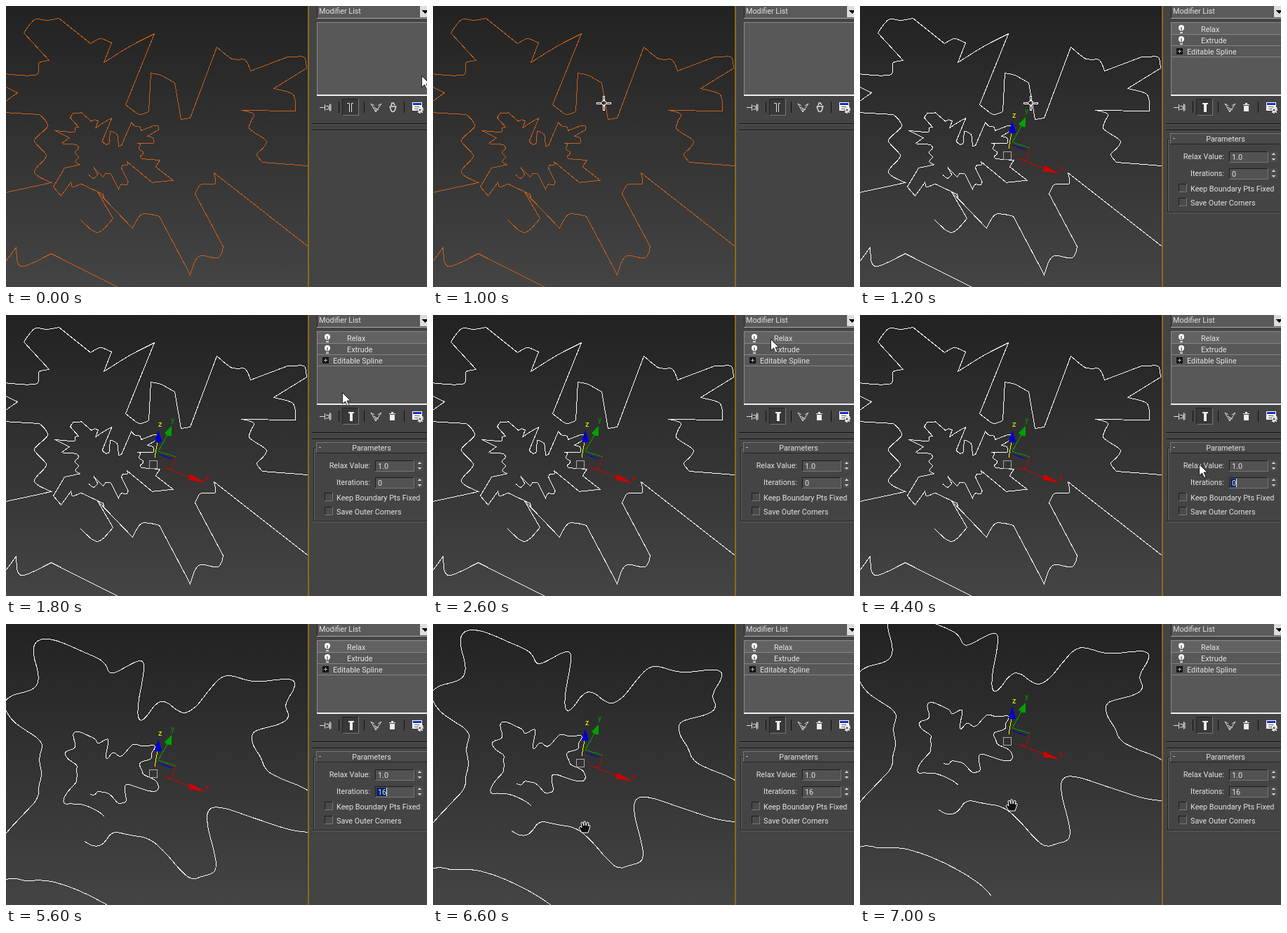
An HTML page that plays this animation: 600 px wide and 400 px high, repeating every 8000 ms.

```html
<!DOCTYPE html>
<html lang="en">
<head>
<meta charset="utf-8">
<title>Relax modifier</title>
<style>
  html, body { margin: 0; height: 100%; overflow: hidden; background: #444; }
  svg { display: block; }
  text { font: 10.8px Roboto, "Noto Sans", sans-serif; fill: #e4e4e4; white-space: pre; }
  .end { text-anchor: end; }
  .mid { text-anchor: middle; }
  .crisp, #gizmo polyline { shape-rendering: crispEdges; }
  #gizmo polyline { fill: none; }
</style>
</head>
<body>
<svg width="600" height="400" viewBox="0 0 600 400">
  <defs>
    <linearGradient id="sky" x2="0" y2="1"><stop stop-color="#222"/><stop offset="1" stop-color="#444"/></linearGradient>
  </defs>
  <rect width="431" height="400" fill="url(#sky)"/>
  <path id="spline" class="crisp" fill="none" transform="translate(.5 .5)"/>

  <g id="gizmo">
    <rect x="204.5" y="207.5" width="11" height="11" fill="none" stroke="#aaa" class="crisp"/>
    <polyline points="217,198 237,205" stroke="#0000c8"/>
    <polyline points="231,169 217,194 242,202" stroke="#00a000"/>
    <polyline points="242,202 236,220 224,217" stroke="#c80000"/>
    <polyline points="228,218 264,232" stroke="#c80000"/>
    <polyline points="212,203 216,180" stroke="#ff0"/>
    <path d="M217,164L212,180Q217,183 222,180Z" fill="#0000d0"/>
    <path d="M236,158L226,168Q230,173 236,172Z" fill="#00a000"/>
    <path d="M285,239L263,227Q260,231 261,235Z" fill="#d00000"/>
    <text x="217" y="159" style="fill:#ff0">z</text>
    <text x="235" y="153" style="fill:#00a000">y</text>
    <text x="284" y="235" style="fill:#d00000">x</text>
  </g>

  <rect x="430" width="170" height="400" fill="#444"/>
  <rect x="430" width="2" height="400" fill="#8a6a1e"/>

  <g class="crisp">
    <path d="M443,0H600V18H443Z" fill="#5a5a5a"/>
    <path d="M443.5,0V18" stroke="#222"/>
    <path d="M443,17.5H600" stroke="#aaa"/>
    <path d="M590,0H600V16H590Z" fill="#ddd"/>
    <path d="M593,6H602L597.5,11Z" fill="#000"/>
    <rect x="443" y="23" width="160" height="104" fill="#585858"/>
    <path d="M443.5,127V23.5H600" fill="none" stroke="#8c8c8c"/>
    <path d="M443,127H600" stroke="#eee" stroke-width="2"/>
    <path d="M436,167.5H600M436,176.5H600" stroke="#111"/>
    <path d="M436,168.5H600M436,177.5H600" stroke="#555"/>
    <path d="M474.5,136V152M510.5,136V152M567.5,136V152" stroke="#111"/>
    <rect x="479.5" y="132.5" width="23" height="23" fill="#383838" stroke="#222"/>
    <path d="M480,155.5H502.5V132" fill="none" stroke="#777"/>
  </g>
  <text x="446" y="11">Modifier List</text>

  <!-- stack toolbar -->
  <g fill="none" stroke="#ddd">
    <path d="M447,144.5H454M454.5,140V149M456,142.5H460V147H456M461.5,139V150M463,140V149"/>
    <path d="M520,139L527,151L535,139M520,139L525,142M535,139L530,142M527,151V146M524,144L531,148"/>
  </g>
  <g class="crisp">
    <rect x="579" y="137" width="14" height="12" fill="#fff"/>
    <rect x="580" y="138" width="12" height="3" fill="#1830c0"/>
    <path d="M582,143.5H590M582,146.5H588" stroke="#555"/>
    <path d="M585,148H595M590,143V153M587,145L594,152M594,145L587,152" stroke="#ddd" stroke-width="2"/>
    <rect x="589" y="147" width="2" height="2" fill="#333"/>
  </g>
  <g id="idleIcons" fill="none" stroke="#ddd">
    <path d="M486,138.5H489.5V151M495,138.5H492.5V151"/>
    <path d="M547,143L549,149Q551,152 554,149L556,142M547,143H555M549,142L550,138H552L554,141" stroke-width="1.5"/>
  </g>

  <g id="active">
    <path d="M488,138H496V140H494V151H490V140H488Z" fill="#eee"/>
    <path d="M547,142H554V150H547ZM546,140H555V141H546ZM549,138H552V140H549Z" fill="#eee"/>
    <path class="crisp" d="M444,24H600V40H444Z" fill="#626262"/>
    <path class="crisp" d="M444,40.5H600M444,56.5H600M444,72.5H600" stroke="#858585"/>
    <g id="bulbs"></g>
    <rect class="crisp" x="451" y="60" width="9" height="9" fill="#151515"/>
    <path class="crisp" d="M453,64.5H458M455.5,62V67" stroke="#bbb"/>
    <text x="486" y="37">Relax</text>
    <text x="486" y="53">Extrude</text>
    <text x="466" y="69">Editable Spline</text>

    <g class="crisp" fill="none">
      <path d="M600,189.5H438.5V293.5H600" stroke="#222"/>
      <path d="M600,190.5H439.5V292M438,294.5H600" stroke="#666"/>
      <path d="M442,181H600V196H442Z" fill="#4a4a4a"/>
      <path d="M442.5,196V181.5H600" stroke="#777"/>
      <path d="M442,196.5H600" stroke="#222"/>
    </g>
    <text x="446" y="192">-</text>
    <text x="521" y="193" class="mid">Parameters</text>
    <text x="519" y="218" class="end">Relax Value:</text>
    <text x="519" y="242" class="end">Iterations:</text>
    <text x="471" y="264">Keep Boundary Pts Fixed</text>
    <text x="471" y="284">Save Outer Corners</text>
    <g id="fields" class="crisp"></g>
    <rect id="selection" class="crisp" x="528" y="233" height="12" fill="#0a246a"/>
    <text x="530" y="219">1.0</text>
    <text id="count" x="530" y="243"></text>
    <rect id="caret" class="crisp" y="233" width="1" height="12" fill="#fff"/>
  </g>

  <path id="arrow" d="M.5,.5V16.5L4.5,13L7.5,19.5L10,18.5L7,12H12Z" fill="#fff" stroke="#000" stroke-width=".8"/>
  <g id="cross" class="crisp">
    <path d="M-10,0H-3M4,0H11M.5,-10V-3M.5,4V11" stroke="#fff" stroke-width="3"/>
    <path d="M-9,0H-3M4,0H10M.5,-9V-3M.5,4V10" stroke="#222"/>
    <path d="M-4,0L.5,-4L5,0L.5,4Z" fill="none" stroke="#fff"/>
  </g>
  <path id="hand" d="M-4,8L-8,1L-6,-1L-4,1L-5,-6L-3,-7L-1,-2L-1,-8L1,-8L2,-2L4,-7L6,-6L5,-1L7,-3L8,-1L5,8Z"
    fill="#111" stroke="#fff" stroke-linejoin="round"/>
</svg>

<script>
const STEP = 200, LOOP = 8000, ITERATIONS = 16;
const $ = id => document.getElementById(id);
const show = (id, on) => $(id).style.display = on ? '' : 'none';
const mix = (a, b, f) => a.map((v, j) => v + (b[j] - v) * f);

// Key points of one open spline: curved runs, joined by straight lines at the slashes.
const OUTLINE = `106,304 130,322 152,302 / 130,264 / 180,316 193,296 218,299 / 262,382 274,356 302,358 309,342 /
  269,267 276,254 298,252 296,237 / 434,345 / 540,333 / 440,262 455,229 / 365,222 357,211 371,193 346,173 353,154 335,148 /
  412,149 409,126 381,117 / 428,88 425,73 401,72 / 348,92 340,76 322,75 300,58 / 262,159 249,161 / 240,109 220,98 206,95 /
  203,150 190,154 170,140 / 211,39 176,57 139,80 / 150,52 133,46 120,53 / 75,17 57,20 40,19 25,38 /
  61,77 47,80 44,97 18,98 / -49,92 / 16,123 / -22,150 / 47,154 59,170 40,192 57,212 40,236 64,251 / -15,268 /
  -80,369 / -43,421 / 14,343 21,370 64,352 / 181,411 190,443`;

// Bezier handles of a Catmull-Rom span from p[i] to p[i + 1].
function handles(p, i) {
  const a = p[i], b = p[i + 1], before = p[i - 1] || a, after = p[i + 2] || b;
  return [a.map((v, j) => v + (b[j] - before[j]) / 6), b.map((v, j) => v - (after[j] - a[j]) / 6)];
}

// Vertices about 11 px apart on the curved runs only; straight lines stay undivided.
function sample(run) {
  return run.flatMap((a, i) => {
    const b = run[i + 1];
    if (!b) return [a];
    const [c, d] = handles(run, i);
    const n = Math.max(1, Math.round(Math.hypot(b[0] - a[0], b[1] - a[1]) / 11));
    return Array.from({ length: n }, (_, k) => {
      const f = k / n, m = mix(c, d, f);
      return mix(mix(mix(a, c, f), m, f), mix(m, mix(d, b, f), f), f);
    });
  });
}

// Every pass pulls each vertex a little towards the middle of its neighbours.
function relax(p) {
  for (let n = 0; n < ITERATIONS; n++)
    p = p.map((v, i) => mix(v, mix(p[i - 1] || v, p[i + 1] || v, .5), .14));
  return p;
}

const rough = OUTLINE.split('/').map(run => sample(run.trim().split(/\s+/).map(s => s.split(',').map(Number))));
const relaxedRuns = [relax(rough.flat())];

// The far end of the extrusion: the same outline drawn towards a vanishing point.
const VANISH = [122, 215];
const far = p => mix(VANISH, p, 1 / (3.08 + .0016 * p[1]));

const toPath = runs => runs.map((run, k) => (k ? 'L' : 'M') + run[0] +
  run.slice(1).map((p, i) => 'C' + [...handles(run, i), p].join(' ')).join('')).join('');

function splinePath(runs, pan) {
  const place = ([x, y]) => [x, y - pan * (38 + .023 * y)];
  return [p => p, far].map(cap => toPath(runs.map(run => run.map(p => place(cap(p)))))).join('');
}

const box = (x, y, w, h, fill) =>
  `<rect x="${x + .5}" y="${y + .5}" width="${w}" height="${h}" fill="${fill}" stroke="#1c1c1c"/>
   <path d="M${x},${y + h + .5}H${x + w + .5}V${y}" fill="none" stroke="#777"/>`;
const spinner = y =>
  `<rect x="584" y="${y}" width="11" height="15" fill="#4c4c4c"/>
   <path d="M587,${y + 5}H592L589.5,${y + 2}ZM587,${y + 10}H592L589.5,${y + 13}Z" fill="#ccc"/>`;
$('fields').innerHTML =
  [207, 231].map(y => box(526, y, 55, 15, '#525252') + spinner(y)).join('') +
  [253, 273].map(y => box(454, y, 11, 11, '#4a4a4a')).join('');
$('bulbs').innerHTML = [31, 47].map(y =>
  `<circle cx="458" cy="${y}" r="4" fill="#fff"/><path d="M456,${y + 3}H460V${y + 8}H456Z" fill="#ddd"/>
   <path d="M458,${y - 1}V${y + 4}M456,${y + 5.5}H460" stroke="#222"/>`).join('');

// start, duration, shape, from, to; the pointer then rests until the next move
const MOVES = [
  [0, 400, 'arrow', [592, 99], [300, 159]],
  [400, 1, 'cross', [249, 169], [249, 169]],
  [800, 200, 'cross', [246, 152], [243, 138]],
  [1600, 200, 'arrow', [505, 159], [479, 110]],
  [1800, 800, 'arrow', [479, 110], [481, 34]],
  [2800, 800, 'arrow', [486, 48], [556, 232]],
  [3800, 600, 'arrow', [552, 228], [483, 212]],
  [5400, 1, 'none', [0, 0], [0, 0]],
  [6400, 600, 'hand', [216, 304], [216, 258]]
];

function render(now) {
  const t = Math.floor(now % LOOP / STEP) * STEP;
  const selected = t >= 1200, relaxed = t >= 5600, typed = t >= 5400;
  const pan = Math.min(1, Math.max(0, (t - 6400) / 600));

  show('gizmo', selected);
  show('active', selected);
  show('idleIcons', !selected);
  $('spline').setAttribute('stroke', selected ? '#fff' : '#c8601a');
  $('spline').setAttribute('d', splinePath(relaxed ? relaxedRuns : rough, pan));
  $('gizmo').setAttribute('transform', `translate(0 ${Math.round(-46 * pan)})`);

  $('count').textContent = typed ? ITERATIONS : 0;
  show('selection', t >= 4200 && t < 5400 || relaxed && t < 6400);
  $('selection').setAttribute('width', typed ? 14 : 9);
  show('caret', t >= 4200 && t < 5000 || typed && t < 6000);
  $('caret').setAttribute('x', typed ? 542 : 536);

  const [start, duration, shape, from, to] = MOVES.findLast(m => m[0] <= t);
  const at = mix(from, to, Math.min(1, (t - start) / duration)).map(Math.round);
  for (const id of ['arrow', 'cross', 'hand']) show(id, id === shape);
  if (shape !== 'none') $(shape).setAttribute('transform', `translate(${at})`);
}

const began = performance.now();
(function tick() {
  render(performance.now() - began);
  requestAnimationFrame(tick);
})();
</script>
</body>
</html>
```
